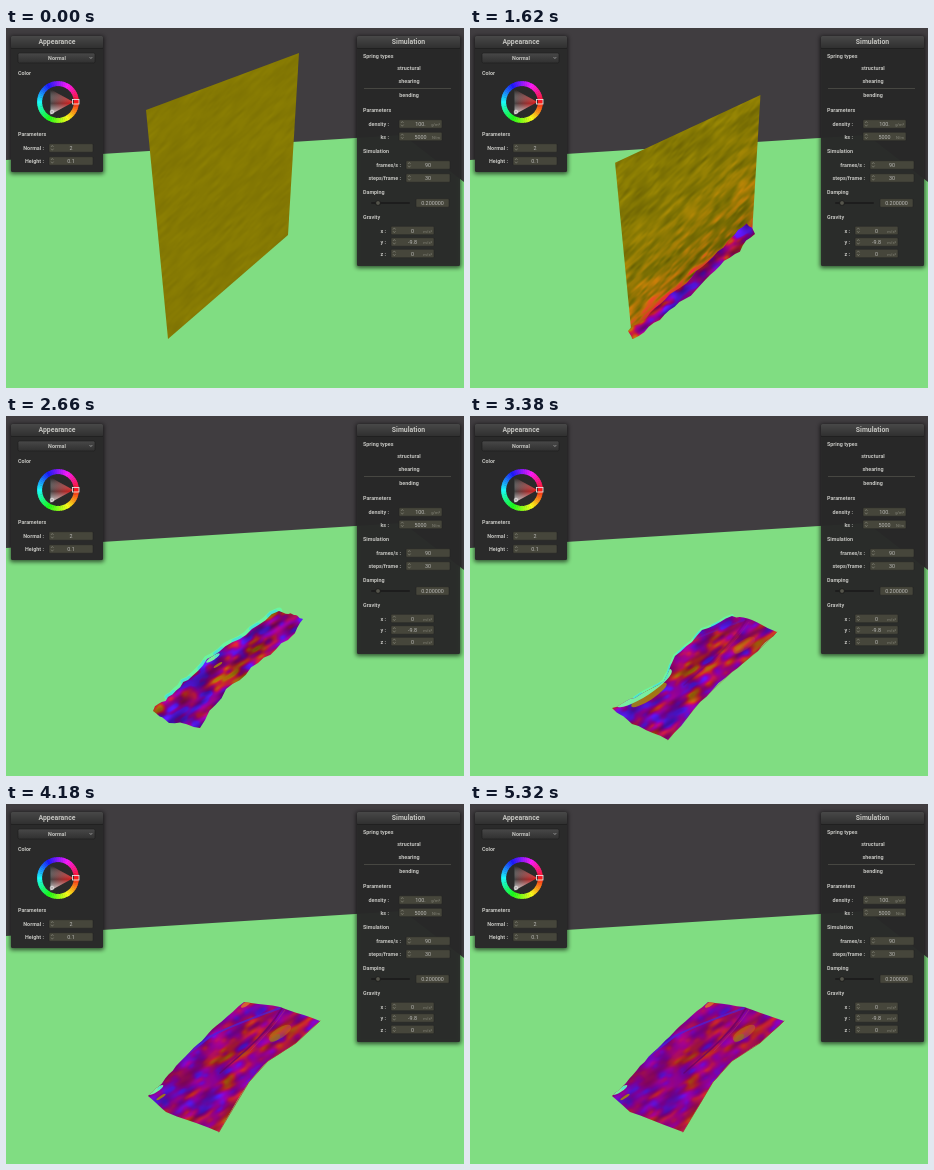
Write an HTML page with a canvas that moves like this. It is 458x360 px and loops after 5.34 s.

```html
<!DOCTYPE html>
<html lang="en">
<head>
<meta charset="utf-8">
<title>Cloth simulation</title>
<style>
html, body { margin: 0; width: 100%; height: 100%; overflow: hidden; background: #403d40; }
svg, canvas { position: absolute; left: 0; top: 0; display: block; }
text { font: 5.4px Roboto, "Open Sans", sans-serif; fill: #b9b9b6; }
.bold { font-weight: 700; fill: #c4c4c0; }
.title { font-size: 6.9px; }
.dim { font-size: 4px; fill: #85857a; }
</style>
</head>
<body>
<svg id="scene" width="458" height="360" viewBox="0 0 458 360">
  <defs>
    <linearGradient id="bar" x2="0" y2="1"><stop stop-color="#484848"/><stop offset="1" stop-color="#303030"/></linearGradient>
    <linearGradient id="hue"><stop stop-color="#444"/><stop offset="1" stop-color="#e01818"/></linearGradient>
    <linearGradient id="white" x2="0" y2="1"><stop stop-color="#111" stop-opacity=".75"/><stop offset=".55" stop-color="#fff" stop-opacity="0"/><stop offset="1" stop-color="#fff" stop-opacity=".8"/></linearGradient>
    <filter id="blur" x="-20%" y="-20%" width="140%" height="140%"><feGaussianBlur stdDeviation="2"/></filter>
  </defs>
  <rect width="458" height="360" fill="#403d40"/>
  <path d="M0 132L397 107L458 154V360H0Z" fill="#80dd82"/>
  <g id="ui"></g>
</svg>
<canvas id="cloth" width="458" height="360"></canvas>
<script>
const LOOP = 5340, FALL = 1080;
const ui = document.getElementById('ui');
const ctx = document.getElementById('cloth').getContext('2d');

// ---------- panels ----------
function add(tag, attrs, content) {
  const node = document.createElementNS('http://www.w3.org/2000/svg', tag);
  for (const key in attrs) node.setAttribute(key, attrs[key]);
  if (content) node.textContent = content;
  ui.appendChild(node);
}
const rect = (x, y, width, height, fill, more) => add('rect', { x, y, width, height, fill, ...more });
const label = (x, y, s, anchor = 'start', cls = '') => add('text', { x, y, 'text-anchor': anchor, class: cls }, s);
const heading = (x, y, s) => label(x, y, s, 'start', 'bold');

function panel(x, y, w, h, title, opacity) {
  rect(x - 1, y, w + 2, h + 2, '#000', { rx: 2, opacity: .62, filter: 'url(#blur)' });
  rect(x, y, w, h, '#2a2a2a', { rx: 1.5, opacity });
  rect(x, y, w, 12, 'url(#bar)', { rx: 1.5 });
  rect(x, y + 12, w, .7, '#1d1d1d');
  label(x + w / 2, y + 8.4, title, 'middle', 'bold title');
}
function field(name, right, base, x, w, value, unit) {
  if (name) label(right, base, name + ' :', 'end', 'bold');
  rect(x, base - 6.2, w, 8.4, '#46463b', { rx: 1, stroke: '#222', 'stroke-width': .5 });
  if (name) add('path', { d: `M${x + 2} ${base - 3}l1.3-1.6 1.3 1.6m0 1.6l-1.3 1.6-1.3-1.6`, fill: 'none', stroke: '#8b8b80', 'stroke-width': .6 });
  label(x + w / 2, base, value, 'middle');
  if (unit) label(x + w - 2, base, unit, 'end', 'dim');
}

panel(5, 8, 92, 136, 'Appearance', 1);
rect(12, 25, 77, 10, 'url(#bar)', { rx: 1.5, stroke: '#1c1c1c', 'stroke-width': .6 });
label(51, 32, 'Normal', 'middle', 'bold');
add('path', { d: 'M83.5 29l1.4 1.6 1.4-1.6', fill: 'none', stroke: '#aaa', 'stroke-width': .7 });
heading(12, 47, 'Color');
for (let i = 0; i < 60; i++) {
  const at = k => `${52 + 18.4 * Math.cos(k * Math.PI / 30)} ${74 + 18.4 * Math.sin(k * Math.PI / 30)}`;
  add('path', { d: `M${at(i - .6)}A18.4 18.4 0 0 1 ${at(i + .6)}`, fill: 'none', stroke: `hsl(${i * 6} 95% 54%)`, 'stroke-width': 5 });
}
for (const fill of ['url(#hue)', 'url(#white)']) add('path', { d: 'M67.5 74L44.5 61.5V86.5Z', fill });
rect(66.5, 71.5, 6.5, 4.5, 'none', { stroke: '#eee', 'stroke-width': .8 });
add('circle', { cx: 46, cy: 84, r: 1.8, fill: 'none', stroke: '#eee', 'stroke-width': .7 });
heading(12, 108, 'Parameters');
field('Normal', 38, 122, 43, 44, '2');
field('Height', 38, 135, 43, 44, '0.1');

panel(351, 8, 103, 230, 'Simulation', .92);
heading(357, 30, 'Spring types');
['structural', 'shearing', 'bending'].forEach((s, i) => label(403, 42 + i * 13.4, s, 'middle', 'bold'));
rect(358, 60, 87, .7, '#55554e');
heading(357, 84, 'Parameters');
field('density', 383, 98, 393, 43, '100.', 'g/m²');
field('ks', 383, 110.5, 393, 43, '5000', 'N/m');
heading(357, 125, 'Simulation');
field('frames/s', 395, 139, 400, 44, '90');
field('steps/frame', 395, 152, 400, 44, '30');
heading(357, 166, 'Damping');
rect(365, 174, 39, 2, '#1d1d1d', { rx: 1 });
add('circle', { cx: 372, cy: 175, r: 2.4, fill: '#55554c', stroke: '#181818', 'stroke-width': .8 });
field('', 0, 177, 410, 33, '0.200000');
heading(357, 191, 'Gravity');
[['x', '0'], ['y', '-9.8'], ['z', '0']].forEach(([axis, v], i) => field(axis, 380, 204.5 + i * 11.5, 385, 43, v, 'm/s²'));

// ---------- helpers ----------
const clamp = (v, lo = 0, hi = 1) => Math.min(hi, Math.max(lo, v));
const mix = (a, b, k) => a + (b - a) * k;

let seed = 11;
const lattice = Float32Array.from({ length: 4096 }, () => (seed = seed * 16807 % 2147483647) / 2147483647);
function noise(x, y) {
  const i = Math.floor(x), j = Math.floor(y);
  let fx = x - i, fy = y - j;
  fx *= fx * (3 - 2 * fx);
  fy *= fy * (3 - 2 * fy);
  const at = (a, b) => lattice[(a & 63) + (b & 63) * 64];
  return mix(mix(at(i, j), at(i + 1, j), fx), mix(at(i, j + 1), at(i + 1, j + 1), fx), fy);
}

// Surface tilt to normal colour: upright olive through red to violet.
const STOPS = [[0, 133, 121, 3], [.22, 176, 104, 8], [.42, 196, 34, 44], [.62, 160, 4, 116], [.8, 134, 0, 165], [1, 84, 22, 228]];
const ramp = Array.from({ length: 256 }, (_, n) => {
  const s = n / 255, i = Math.max(1, STOPS.findIndex(stop => stop[0] >= s));
  const a = STOPS[i - 1], b = STOPS[i], k = (s - a[0]) / (b[0] - a[0]);
  return [1, 2, 3].map(c => mix(a[c], b[c], k));
});

function track(times, values, t) {
  if (t <= times[0]) return values[0];
  for (let i = 1; i < times.length; i++) {
    if (t > times[i]) continue;
    const k = (t - times[i - 1]) / (times[i] - times[i - 1]), a = values[i - 1], b = values[i];
    return Array.isArray(a) ? a.map((v, n) => mix(v, b[n], k)) : mix(a, b, k);
  }
  return values[values.length - 1];
}

// ---------- cloth ----------
const floorLine = x => 311 - (x - 162) * .865;

// Heap outline, clockwise from the left tip.
const TIMES = [FALL, 1620, 2140, 2660, 3380, 4180];
const HEAP = [
  [158,303, 180,285, 205,263, 232,239, 258,213, 276,196, 282,200, 285,206, 265,226, 240,247, 215,271, 190,292, 163,311],
  [150,290, 162,284, 190,261, 225,233, 255,205, 284,178, 287,194, 288,212, 272,236, 240,251, 205,280, 180,304, 160,313],
  [147,295, 162,281, 182,264, 207,240, 240,219, 273,195, 288,199, 297,203, 282,224, 252,247, 220,273, 194,312, 163,307],
  [142,292, 165,282, 194,265, 205,240, 232,214, 262,200, 282,204, 307,216, 288,235, 262,256, 230,286, 198,324, 162,308],
  [142,292, 152,283, 170,262, 192,240, 210,222, 238,198, 274,203, 314,217, 290,239, 262,257, 243,278, 213,328, 160,308]
];
HEAP.unshift(HEAP[0].map((v, i, all) => i % 2 ? floorLine(all[i - 1]) : v));

const layer = document.createElement('canvas');
layer.width = 458;
layer.height = 360;
const layerCtx = layer.getContext('2d');

function fillTextured(path, x0, y0, x1, y1, surface) {
  const w = x1 - x0, image = layerCtx.createImageData(w, y1 - y0), data = image.data;
  for (let y = y0, o = 0; y < y1; y++) for (let x = x0; x < x1; x++, o += 4) {
    const [tilt, light] = surface(x, y), colour = ramp[Math.round(clamp(tilt) * 255)];
    for (let c = 0; c < 3; c++) data[o + c] = colour[c] * light;
    data[o + 3] = 255;
  }
  layerCtx.putImageData(image, x0, y0);
  ctx.save();
  ctx.clip(path);
  ctx.drawImage(layer, x0, y0, w, y1 - y0, x0, y0, w, y1 - y0);
  ctx.restore();
}

function drawSheet(t) {
  const drop = .23 * Math.pow(Math.max(0, t - FALL) / 540, 1.663);
  if (drop >= 1) return;
  const left = mix(82, 311, drop), right = mix(25, 207, drop);
  const path = new Path2D(`M${mix(140, 162, drop)} ${left}L${mix(293, 282, drop)} ${right}L282 207L162 311Z`);
  const wave = clamp((t - FALL) / 500), fall = drop * 205;
  fillTextured(path, 138, Math.floor(right), 295, 313, (x, y) => {
    const height = floorLine(x) - y, m = height + fall;
    const n = noise(x / 13 + 9, m / 5) * .65 + noise(x / 6, m / 3 + 20) * .35 - .5;
    const low = Math.exp(-Math.max(0, height) / 38);
    return [wave * (low * (.16 + n * 1.1) + Math.exp(-Math.max(0, height) / 11) * .4),
            1 + n * (.12 + wave * (.22 + low * .75))];
  });
}

function heapOutline(t) {
  const flat = track(TIMES, HEAP, t), jag = track(TIMES, [0, 5, 9, 6, 3, 1.5], t);
  const corners = [], points = [];
  for (let i = 0; i < flat.length; i += 2) corners.push([flat[i], flat[i + 1]]);
  corners.forEach(([x, y], i) => {
    const [nx, ny] = corners[(i + 1) % corners.length];
    for (let k = 0; k < 5; k++) {
      const shift = k ? jag * (noise(i * 5 + k + .5, t / 260) - .5) : 0;
      points.push([mix(x, nx, k / 5) + shift * .55, mix(y, ny, k / 5) + shift]);
    }
  });
  return { corners, points };
}
const polyline = points => 'M' + points.map(p => p.join(' ')).join('L');

function stroke(d, colour, width, alpha) {
  ctx.globalAlpha = alpha;
  ctx.strokeStyle = colour;
  ctx.lineWidth = width;
  ctx.stroke(new Path2D(d));
  ctx.globalAlpha = 1;
}
function ellipse(x, y, rx, ry, colour, alpha) {
  ctx.globalAlpha = alpha;
  ctx.fillStyle = colour;
  ctx.beginPath();
  ctx.ellipse(x, y, rx, ry, -.58, 0, 7);
  ctx.fill();
  ctx.globalAlpha = 1;
}

function drawHeap(t) {
  if (t <= FALL) return;
  const { corners, points } = heapOutline(t);
  const path = new Path2D(polyline(points) + 'Z');
  const back = track([2200, 2660, 3380, 4100], [0, 7, 4, 0], t);
  ctx.lineJoin = ctx.lineCap = 'round';
  if (back > 0) {
    stroke(polyline(points.slice(5, 26)), '#6af5a0', back, 1);
    ctx.setLineDash([7, 15]);
    stroke(polyline(points.slice(5, 26)), '#43dfe0', back * .8, .8);
    ctx.setLineDash([]);
  }
  const contrast = track([1620, 2660, 3380, 4180, 5320], [1.45, 1.5, 1.15, .95, .8], t);
  const drift = track([FALL, 2140, 2660, 3380, 4180], [0, 2.4, 4.4, 5.7, 6.1], t);
  const xs = points.map(p => p[0]), ys = points.map(p => p[1]);
  fillTextured(path, Math.floor(Math.min(...xs)), Math.floor(Math.min(...ys)), Math.ceil(Math.max(...xs)), Math.ceil(Math.max(...ys)), (x, y) => {
    const a = x * .84 - y * .54, b = x * .54 + y * .84;
    const n = noise(a / 17 + 7, b / 6.5 + drift) * .65 + noise(a / 7, b / 4 + drift) * .35;
    return [.66 + (n - .5) * contrast, .95 + (noise(a / 13 + drift, b / 5 + 31) - .5) * contrast * .4];
  });

  ctx.save();
  ctx.clip(path);
  const open = track([2500, 2700, 3380, 4180], [0, .3, 1, .26], t);
  if (open > 0) {
    const [x, y] = track([2660, 3380, 4180], [[207, 242], [174, 272], [150, 286]], t);
    ellipse(x + 5, y + 7, 21 * open, 5 * open, '#a88a08', .85);
    ellipse(x, y, 33 * open, 8 * open, '#78eea0', 1);
    ellipse(x + 15 * open, y - 9 * open, 11 * open, 5 * open, '#4fe3cf', .85);
  }
  const settled = clamp((t - 2900) / 1100);
  stroke('M274 204C250 213 229 220 205 232L165 263', '#4826dc', 2, settled * .7);
  stroke('M276 204Q264 225 239 247L214 269', '#66006a', 1.6, settled * .75);
  stroke('M279 206Q267 224 244 247', '#b03070', 1, settled * .6);
  ellipse(274, 229, 13, 5, '#c2741a', settled * .5);
  ellipse(269, 234, 6, 3, '#8f8010', settled * .55);
  ellipse(240, 200, 6, 2, '#e07a20', settled * .8);
  ctx.restore();
  if (settled > 0) {
    const edge = polyline(corners.slice(7, 12));
    stroke(edge, '#b43420', 1, settled * .7);
  }
}

function draw(t) {
  ctx.clearRect(0, 0, 458, 360);
  drawSheet(t);
  drawHeap(t);
}

const start = performance.now();
function frame() {
  draw((performance.now() - start) % LOOP);
  requestAnimationFrame(frame);
}
frame();
</script>
</body>
</html>
```
